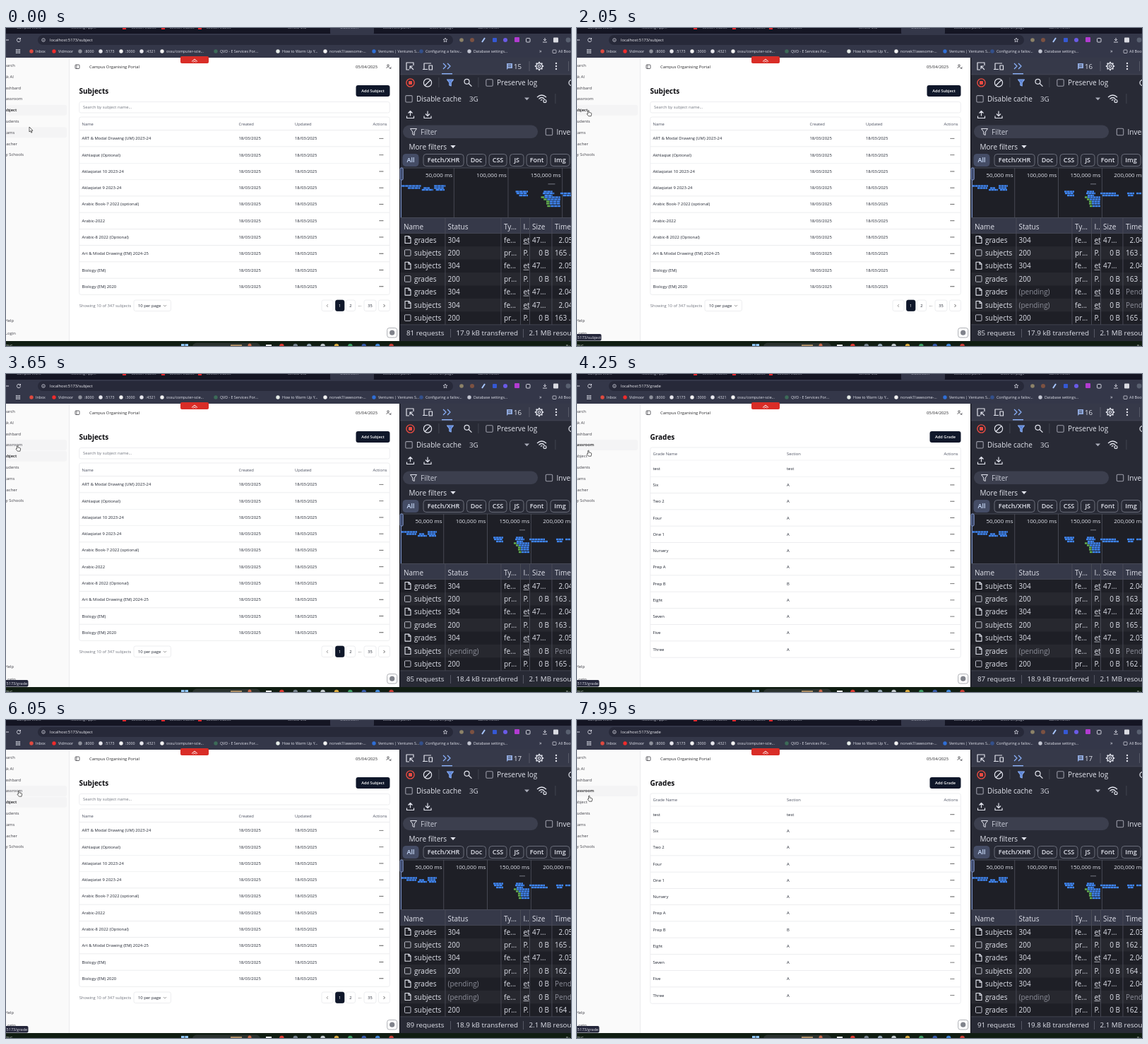
These frames come from a looping animation (800x450 px, 8000 ms). An HTML page with a canvas:

```html
<!DOCTYPE html>
<html lang="en">
<head>
<meta charset="utf-8">
<title>Class portal with network panel</title>
<style>
html, body { margin: 0; width: 800px; height: 450px; overflow: hidden; background: #0b0b16 }
canvas { display: block }
</style>
</head>
<body>
<canvas id="stage" width="800" height="450"></canvas>
<script>
const ctx = document.getElementById('stage').getContext('2d');
const LOOP = 8000, LOAD = 2200;
const INK = '#0f172a', BORDER = '#e6e7ea', LIGHT = '#e1e3ec', RULE = '#474a57', BLUE = '#8ab0f8';
const CHROME = '#343749', BAR = '#363949', PANEL = '#282a35', GRID = '#1e1f26';

function text(s, x, y, size, color, weight = 400, align = 'left') {
  ctx.font = `${weight} ${size}px "Open Sans", "Noto Sans", sans-serif`;
  ctx.fillStyle = color;
  ctx.textAlign = align;
  ctx.fillText(s, x, y + size * 0.35);
}
function box(x, y, w, h, fill, r = 0, stroke, lw = 0.7) {
  ctx.beginPath();
  ctx.roundRect(x, y, w, h, r);
  if (fill) { ctx.fillStyle = fill; ctx.fill(); }
  if (stroke) { ctx.strokeStyle = stroke; ctx.lineWidth = lw; ctx.stroke(); }
}
function dot(x, y, r, fill, stroke, lw = 1) {
  box(x - r, y - r, 2 * r, 2 * r, fill, r, stroke, lw);
}
function path(d, x, y, stroke, lw = 1, fill) {
  const p = new Path2D(d);
  ctx.save();
  ctx.translate(x, y);
  ctx.lineJoin = 'round';
  if (fill) { ctx.fillStyle = fill; ctx.fill(p); }
  if (stroke) { ctx.strokeStyle = stroke; ctx.lineWidth = lw; ctx.stroke(p); }
  ctx.restore();
}

// Timeline: each click opens the other page and sends a preflight plus a fetch.
const clicks = [700, 1700, 3900, 4700, 6400];
const preflight = [161, 165, 161, 163, 163, 165, 162, 164, 162];
const fetchTime = [2.05, 2.05, 2.04, 2.04, 2.05, 2.03, 2.04, 2.04, 2.04];
const track = [
  [0, 34, 144], [150, 31, 138], [550, 17, 104], [800, 17, 104], [1100, 17.5, 112],
  [1400, 17, 120], [2050, 17, 120.5], [3000, 17, 120.5], [3400, 17, 106], [3650, 17, 105],
  [4000, 17, 105], [4500, 17, 119], [5000, 16.5, 120.5], [5500, 17, 120], [5900, 19, 104],
  [6750, 19, 104], [7650, 18, 110], [7950, 18, 111], [8000, 18, 111]
];
const issued = k => clicks[k - 4] ?? -9999;
const doneAt = (k, t) => t >= issued(k) + LOAD;

function cursorAt(t) {
  const i = Math.max(1, track.findIndex(p => p[0] > t));
  const [a, b] = [track[i - 1], track[i]];
  let u = (t - a[0]) / (b[0] - a[0]);
  u = u * u * (3 - 2 * u);
  return [a[1] + (b[1] - a[1]) * u, a[2] + (b[2] - a[2]) * u];
}

const bookmarks = [
  [42, 'Inbox', '#e04a3f'], [74, 'Vidmoor', '#f02b2b'], [111, ':8000', '#8e919c'], [140, ':5173', '#e8e8ee'],
  [169, ':3000', '#f2f2f2'], [198, ':4321', '#e8e8ee'], [227, 'ossu/computer-scie...', '#f2f2f2'],
  [303, 'QVD - E Services Por...', '#3d6b58'], [391, 'How to Warm Up Y...', '#e5ece8'],
  [458, 'norvek7/awesome-...', '#f2f2f2'], [527, 'Ventures | Ventures S...', '#2f6fd6'],
  [594, 'Configuring a failov...', '#33508c'], [662, 'Database settings...', '#c3c6d2']
];

function browser(grade) {
  box(0, 0, 800, 9, '#141523');
  box(459, -4, 62, 14, CHROME, 4);
  [[15, 'Campus Work'], [92, 'Meeting App...'], [178, 'Lesson videos'], [232, 'Lesson videos'], [284, 'Lesson videos'],
   [399, 'School site'], [473, 'Classroom'], [534, 'Localhost panel'], [600, 'Docs on page'], [668, 'Game notes']]
    .forEach(([x, s]) => text(s, x, -0.5, 5.3, '#b9bbc8'));
  [165, 220, 272].forEach(x => box(x, -2, 5, 4, '#e3262b'));
  box(0, 8, 800, 34, CHROME);
  box(45, 10, 588, 14, '#272939', 7);
  path('M2.2-1.4A2.6 2.6 0 1 0 2.6 .4M2.5-3V-1H.6', 18, 17, LIGHT, 0.9);
  path('M-3 0H3M-1-2L-3 0L-1 2', 1, 17, LIGHT, 0.9);
  dot(53, 17, 2.3, null, LIGHT, 0.7);
  path('M0-.3V1.3M0-1.3V-.9', 53, 17, LIGHT, 0.7);
  text('localhost:5173/' + (grade ? 'grade' : 'subject'), 62, 17, 5.8, '#f0f0f5', 500);
  path('M0-3L.8-.9L3-.8L1.3 .7L1.9 2.8L0 1.6L-1.9 2.8L-1.3 .7L-3-.8L-.8-.9Z', 622, 17, LIGHT, 0.7);
  dot(645, 17, 2.8, '#8d8368'); dot(660, 17, 3, '#7c5141');
  path('M-2 3L2-3', 676, 17, '#a9c8ff', 2);
  box(689, 14, 6, 6, '#3558d3', 1); dot(707, 17, 3, '#6a5be6'); box(720, 13, 7, 7, '#b23bd1', 1);
  box(736.5, 14.5, 5.5, 5.5, null, 1, LIGHT, 0.9);
  path('M0-3V1M-2-1L0 1L2-1M-3 3H3', 763, 17, LIGHT, 0.9);
  box(775, 13.5, 7, 7, '#dadbe2', 1); dot(796, 17, 3.4, '#596070');
  for (let i = 0; i < 9; i++) box(14 + i % 3 * 2.3, 30 + (i / 3 | 0) * 2.3, 1.4, 1.4, LIGHT);
  bookmarks.forEach(([x, s, c]) => { dot(x - 6, 33, 2.7, c); text(s, x, 33, 5.3, LIGHT); });
  text('»', 755, 33, 7, LIGHT);
  box(774, 31, 5, 4.5, null, 0.7, LIGHT);
  text('All Bookmarks', 782, 33, 5.4, LIGHT);
}

const menu = ['Search', 'Ask AI', 'Dashbard', 'Classroom', 'Subject', 'Students', 'Exams', 'Teacher', 'My Schools'];
const menuY = i => 53 + i * 15.8;

function sidebar(active, hover) {
  box(0, 42, 90, 401, '#fafafa');
  [...new Set([active, hover])].forEach(i => box(-6, menuY(i) - 7.5, 92, 15, '#f4f4f5', 3));
  menu.forEach((s, i) => text(s, -5.5, menuY(i), 5.85, i === active ? '#18181b' : '#3f3f46', i === active ? 600 : 400));
  text('Help', -1.5, 413.5, 5.85, '#3f3f46');
  text('Login', -1, 431.5, 5.85, '#3f3f46');
  box(89.2, 42, 0.8, 401, '#e7e7ea');
}

function pageHead(title, button, bx) {
  box(90, 42, 467, 401, '#fff');
  box(98, 52, 6, 5.5, null, 1, '#3f3f46', 0.8);
  path('M0 0V5.5', 100, 52, '#3f3f46', 0.7);
  text('Campus Organising Portal', 118, 55, 5.85, '#27272a');
  text('05/04/2025', 495, 55, 5.85, '#27272a');
  dot(541, 53, 1.3, null, '#3f3f46', 0.7);
  path('M-3 3Q-2 0 1 1M1 2L4 3.5M2 4L4 1', 541.5, 54, '#3f3f46', 0.7);
  box(247, 40, 40, 10, '#d92d27', 2);
  path('M-4 1.5L0-2L4 1.5M-2 2.5L0 .5L2 2.5', 267, 46, '#fff', 1);
  text(title, 103.5, 89.5, 10, '#0b0b0f', 700);
  box(bx, 81, 543.5 - bx, 16, INK, 3);
  text(button, (bx + 543.5) / 2, 89, 5.7, '#fff', 600, 'center');
}

function table(top, headH, cols, rows) {
  const h = 23.27;
  box(103.7, top, 439.6, headH + h * rows.length, '#fff', 2.5, BORDER);
  cols.forEach(([x, s]) => text(s, x, top + headH / 2 + 0.3, 5.85, '#4b5060', 500));
  text('Actions', 539.5, top + headH / 2 + 0.3, 5.85, '#4b5060', 500, 'right');
  rows.forEach((row, i) => {
    const y = top + headH + i * h;
    box(104, y - 0.35, 439, 0.7, BORDER);
    row.forEach((s, c) => text(s, cols[c][0], y + h / 2, 5.9, '#1f2430'));
    for (let d = -2; d <= 2; d += 2) dot(531.5 + d, y + h / 2, 0.65, '#111');
  });
}

const subjects = ['ART & Modal Drawing (UM) 2023-24', 'Akhlaqiat (Optional)', 'Aklaqiatat 10 2023-24', 'Aklaqiatat 9 2023-24',
  'Arabic Book-7 2022 (optional)', 'Arabic-2022', 'Arabic-8 2022 (Optional)', 'Art & Modal Drawing (EM) 2024-25',
  'Biology (EM)', 'Biology (EM) 2020'].map(s => [s, '18/03/2025', '18/03/2025']);
const grades = ['test', 'Six', 'Two 2', 'Four', 'One 1', 'Nursery', 'Prep A', 'Prep B', 'Eight', 'Seven', 'Five', 'Three']
  .map(s => [s, s === 'test' ? 'test' : s === 'Prep B' ? 'B' : 'A']);

function gradePage() {
  pageHead('Grades', 'Add Grade', 499.5);
  table(104, 18, [[107.5, 'Grade Name'], [297, 'Section']], grades);
}
function subjectPage() {
  pageHead('Subjects', 'Add Subject', 495.5);
  box(103.7, 104.5, 439.6, 15.5, '#fff', 2.5, BORDER);
  text('Search by subject name...', 109, 112.3, 5.85, '#71757f');
  table(126, 18.7, [[107.5, 'Name'], [329.5, 'Created'], [409, 'Updated']], subjects);
  text('Showing 10 of 347 subjects', 103.7, 393, 5.85, '#6f737d');
  box(181, 385, 52.5, 15.5, '#fff', 2.5, BORDER);
  text('10 per page', 187, 393, 5.85, '#1f2430');
  path('M-2-1L0 1L2-1', 225, 393, '#777', 0.7);
  [[447, 16, ''], [466.5, 12.5, '1'], [481.5, 13, '2'], [507, 17, '35'], [527.5, 16, '']].forEach(([x, w, s]) => {
    box(x, 385, w, 15.5, s === '1' ? INK : '#fff', 2.5, s === '1' ? INK : BORDER);
    text(s, x + w / 2, 393, 5.7, s === '1' ? '#fff' : '#1f2430', 500, 'center');
  });
  path('M1-2L-1 0L1 2', 455, 393, '#777', 0.7);
  path('M-1-2L1 0L-1 2', 535.5, 393, '#222', 0.7);
  text('...', 498.5, 392, 6, '#333');
}

const FUNNEL = 'M-4.5-4.5H4.5L1.2 0V4.5L-1.2 3.5V0Z';
function check(x, y, label) {
  box(x - 4.7, y - 4.7, 9.4, 9.4, null, 1.5, '#9a9ca8', 1.1);
  if (label) text(label, x + 10.5, y + 0.3, 10, LIGHT);
}

function devToolbars(n) {
  box(557, 42, 243, 401, PANEL);
  box(558, 42, 242, 24, BAR);
  box(557, 42, 1.2, 401, '#12131b');
  path('M5-1V-5H-5V5H-1M0 0L5 5M0 4V0H4', 572, 54, LIGHT, 1.2);
  path('M-5 4V-4H5M-7 4.5H0M2-1H6.5V5H2Z', 597, 54, LIGHT, 1.2);
  path('M-5-4L-1 0L-5 4M1-4L5 0L1 4', 624, 54, BLUE, 1.3);
  box(617, 64, 15, 1.8, BLUE);
  path('M-4-4H4V3H-2L-4 5Z', 713, 54, null, 0, '#8fa9dd');
  path('M-2-1.7H2M-2 .7H2', 713, 54, BAR, 0.9);
  text(15 + ((n - 3) >> 1), 719, 54.3, 9.7, LIGHT);
  box(740.5, 47, 1, 14, '#585b68');
  dot(755, 54, 4.3, null, LIGHT, 1.5); dot(755, 54, 1.7, null, LIGHT, 1.1);
  for (let k = 0; k < 8; k++) {
    const a = k * Math.PI / 4, c = Math.cos(a), s = Math.sin(a);
    path(`M${c * 4.5} ${s * 4.5}L${c * 6.2} ${s * 6.2}`, 755, 54, LIGHT, 1.8);
  }
  [-4, 0, 4].forEach(d => dot(779, 54 + d, 1.2, LIGHT));
  box(796, 47, 1, 14, '#585b68');
  box(558, 65.5, 242, 0.8, RULE);

  dot(572.5, 77.5, 5.6, null, '#ea4b41', 1.4); box(570, 75, 5, 5, '#ea4b41', 0.7);
  dot(597, 77.5, 5.6, null, LIGHT, 1.2); path('M-4 4L4-4', 597, 77.5, LIGHT, 1.2);
  box(612.5, 70, 0.8, 14, RULE);
  path(FUNNEL, 629, 77.5, BLUE, 1.1, '#5b82d0');
  dot(652.5, 75.8, 3.5, null, LIGHT, 1.2); path('M0 0L4.4 4.4', 655, 78.2, LIGHT, 1.3);
  box(668.5, 70, 0.8, 14, RULE);
  check(684.5, 77.5, 'Preserve log');
  dot(801, 77.5, 4, null, LIGHT, 1.2);
  check(570.5, 100.3, 'Disable cache');
  text('3G', 656, 100.7, 9.7, LIGHT);
  path('M-3.5-1.7H3.5L0 1.9Z', 737.5, 100.3, null, 0, '#aaadba');
  path('M-6.5-2Q0-8 6.5-2M-4 .5Q0-3.5 4 .5M-1.5 2.5Q0 1 1 2', 758.5, 100, LIGHT, 1.2);
  dot(763, 103.5, 2, null, LIGHT, 1.2);
  box(777.5, 93, 0.8, 14, RULE);
  path('M0 2V-5M-3-2L0-5L3-2M-5 2V5H5V2', 572.5, 122.5, LIGHT, 1.2);
  path('M0-5V2M-3-1L0 2L3-1M-5 2V5H5V2', 597, 122.5, LIGHT, 1.2);

  box(562, 137.5, 191, 18.5, '#3c3f4e', 9);
  path(FUNNEL, 577, 147, LIGHT, 1);
  text('Filter', 587, 147.3, 10, '#c6c9d5');
  check(769, 147, 'Invert');
  text('More filters', 570.5, 168, 10, LIGHT);
  path('M-3.7-2H3.7L0 2.2Z', 633, 168, null, 0, LIGHT);
  [[562, 22, 'All'], [591, 57, 'Fetch/XHR'], [652.5, 27, 'Doc'], [684, 25, 'CSS'], [713.5, 19.5, 'JS'], [737, 29, 'Font'], [771, 27, 'Img']]
    .forEach(([x, w, s], i) => {
      box(x, 178.5, w, 17, i ? null : '#454d66', 4, i ? '#696c79' : '#454d66', 1);
      text(s, x + w / 2, 187.3, 9, i ? LIGHT : '#cfe0ff', 600, 'center');
    });
}

// Request bars on the wider scale: x, y, width; the last few begin in green.
const bars = [
  [560, 223.5, 22], [567, 226.5, 14], [583, 229, 13], [597, 223.5, 13], [585, 226.5, 7], [597, 226.5, 11], [599, 229, 10],
  [690, 231.5, 14], [691, 234, 12], [694, 237, 10], [722, 231.5, 10], [721, 234, 13], [723, 237, 9],
  [741, 234, 22], [744, 237, 23], [779, 234, 10], [780, 237, 8], [792, 234, 7]
];
const greenBars = [[719, 239.5, 22], [722, 242.5, 19], [725, 245.5, 16], [725, 248.5, 16], [726, 252, 15]];

function overview(scale) {
  box(558, 198, 242, 71, GRID);
  box(558, 197.6, 242, 0.8, RULE);
  const at = x => 559 + (x - 559) * scale;
  ['50,000', '100,000', '150,000', '200,000'].forEach((s, i) => {
    const x = at(619.3 + i * 61.8);
    box(x, 198, 0.9, 70, '#4b4d58');
    text(s + ' ms', x - 1.7, 208, 8, LIGHT, 400, 'right');
  });
  const draw = ([x, y, w], green) => {
    for (let d = 0; d < w; d += 4) {
      box(at(x + d), y - 1.2, Math.min(3.6, w - d) * scale, 2.4, green && d < 4 ? '#63b04e' : '#3f86f2');
    }
  };
  bars.forEach(b => draw(b, false));
  greenBars.forEach(b => draw(b, true));
  box(at(727), 220.3, 8 * scale, 1, '#777a85');
  box(558.6, 198, 1.3, 70, '#7f97cf');
  box(558.2, 198, 4, 17, '#3a4668', 1.5, '#8da4da', 0.9);
  box(558, 268, 242, 0.9, RULE);
}

function requestRow(i, k, isFetch, t) {
  const y = 300 + i * 18.4, name = k % 2 ? 'subjects' : 'grades';
  const wait = isFetch && !doneAt(k, t), tone = wait ? '#8c8e99' : LIGHT;
  if (i % 2) box(558, y - 9.2, 242, 18.4, '#27282f');
  if (isFetch) path('M-4-5H1.5L4-2.5V5H-4ZM1-4.5V-2H3.7', 569, y - 0.5, LIGHT, 1.1);
  else box(564.5, y - 4.5, 8.5, 8.5, null, 1, '#b9bbc6', 1);
  text(name, 578, y, 10, LIGHT);
  text(wait ? '(pending)' : isFetch ? '304' : '200', 625.5, y, 10, tone);
  text(isFetch ? 'fe...' : 'pr...', 705, y, 10, LIGHT);
  text(isFetch ? 'et' : 'P.', 732.5, y, 10, LIGHT);
  if (isFetch) box(732.5, y + 5, 8, 0.8, LIGHT);
  const zero = wait || !isFetch;
  text(zero ? '0 B' : '47...', zero ? 769 : 745, y, 10, LIGHT, 400, zero ? 'right' : 'left');
  if (wait) text('Pending', 777, y, 10, tone);
  else if (isFetch) text(fetchTime[k].toFixed(2) + ' s', 782.5, y, 10, LIGHT);
  else text(preflight[k] + ' ...', 777, y, 10, LIGHT);
}

function requests(n, t) {
  box(558, 269, 242, 22, BAR);
  box(558, 290.8, 242, 129, GRID);
  [[n - 3, 1], [n - 2, 0], [n - 2, 1], [n - 1, 0], [n - 1, 1], [n, 1], [n, 0]]
    .forEach(([k, f], i) => requestRow(i, k, !!f, t));
  [[563, 'Name'], [625.5, 'Status'], [705, 'Ty...'], [732.5, 'I..'], [745, 'Size'], [777, 'Time']]
    .forEach(([x, s]) => text(s, x, 281, 10, LIGHT));
  [621.5, 700.5, 728, 741, 772.5].forEach(x => box(x, 269, 0.9, 151, '#4b4d58'));
  box(558, 290.3, 242, 0.8, RULE);
  box(558, 419.8, 242, 23.2, PANEL);
  box(558, 419.5, 242, 0.8, RULE);
  let kb = 17.9;
  [18.4, 18.9, 19.4, 19.8].forEach((v, i) => { if (doneAt(4 + i, t)) kb = v; });
  text(81 + 2 * (n - 3) + ' requests', 567, 432, 9.8, LIGHT);
  text(kb.toFixed(1) + ' kB transferred', 637.5, 432, 9.8, LIGHT);
  text('2.1 MB resources', 740.5, 432, 9.8, LIGHT);
  [629, 732].forEach(x => box(x, 426, 0.9, 12, '#5b5d69'));
}

function taskbar() {
  box(0, 443, 800, 7, '#101d12');
  text('37°C', -4, 449.5, 6, '#d8ddd9');
  box(248, 447, 4.6, 3, '#8fc5f5'); box(253.4, 447, 4.6, 3, '#8fc5f5');
  box(264, 445.5, 96, 12, '#2b332f', 6);
  box(318, 448, 16, 2, '#a88b62'); dot(345, 449, 2.5, '#c9694b');
  ['#f1f1f1', '#dd3a32', '#75818b', '#93a5b3', '#c1c8cc', '#d7a940', '#3c9b62', '#3659a9', '#4187d8', '#c83c34']
    .forEach((c, i) => i ? dot(371 + i * 19.4, 450, 3.2, c) : box(368, 448, 8, 2, c));
  text('5:', 793, 450, 6, '#d8ddd9');
}

function cursor(x, y) {
  if (x > 26) path('M-1-4V3L.6 1.6L1.8 4.2L3 3.6L1.8 1.2H4Z', x, y, '#222', 0.7, '#fff');
  else path('M-1.5 .8V-3.5Q-.8-4.5 0-3.5V-1L3-.3Q3.8 0 3.6 1L3 4.2H-.7L-3 1.2Q-2.7 .1-1.5 .8Z', x, y, '#222', 0.7, '#fff');
}

function frame(now) {
  const t = now % LOOP;
  const n = 3 + clicks.filter(c => t >= c).length;
  const grade = n % 2 === 0;
  const [cx, cy] = cursorAt(t);
  const hover = Math.round((cy - 4 - 53) / 15.8);
  browser(grade);
  grade ? gradePage() : subjectPage();
  box(539.7, 424.5, 14, 13.5, '#fff', 3, '#8b8e96');
  dot(546.7, 431.2, 3.6, '#80838b');
  sidebar(grade ? 3 : 4, hover);
  if (t > 300 && (hover === 3 || hover === 4)) {
    box(-4, 433, hover === 3 ? 35.5 : 38.5, 9.5, '#24263a', 2);
    text(':5173/' + (hover === 3 ? 'grade' : 'subject'), -1, 437.8, 5.6, '#e3e4ec');
  }
  devToolbars(n);
  overview(n === 3 ? 76.7 / 61.8 : 1);
  requests(n, t);
  taskbar();
  cursor(cx, cy);
}

const start = performance.now();
function tick() {
  frame(performance.now() - start);
  requestAnimationFrame(tick);
}
tick();
</script>
</body>
</html>
```
